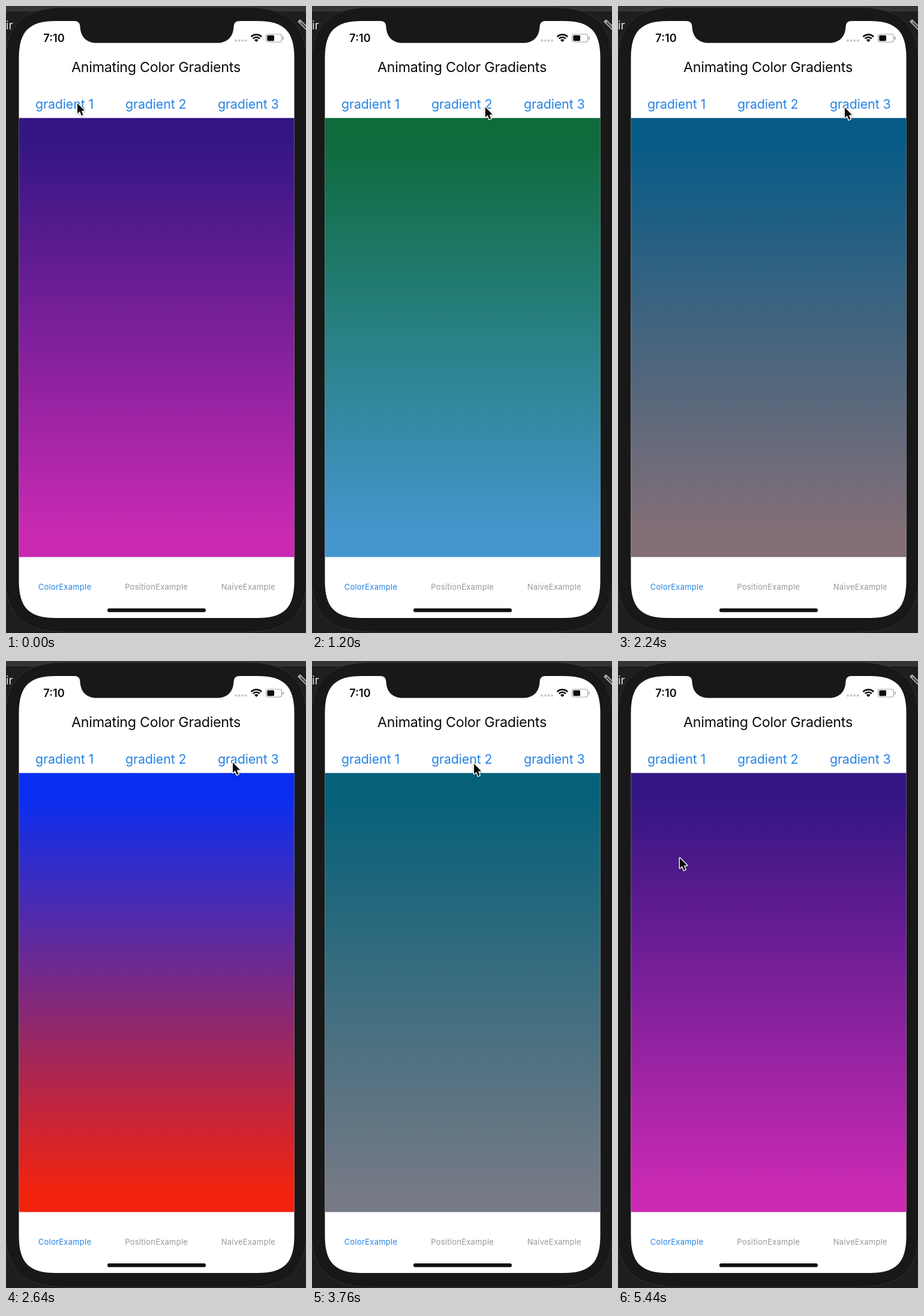
An HTML page with a canvas that plays this animation: 500x1044 px, repeating every 5520 ms.

```html
<!DOCTYPE html>
<html lang="en">
<head>
<meta charset="utf-8">
<title>Animating Color Gradients</title>
<style>
  html, body { margin: 0; width: 100%; height: 100%; overflow: hidden; background: #1e1e1f; }
  canvas { display: block; }
</style>
</head>
<body>
<canvas id="stage" width="500" height="1044"></canvas>
<script>
const ctx = document.getElementById('stage').getContext('2d');
const LOOP = 5520, STEP = 80, FADE = 600;
const FONT = 'Inter, Roboto, "Liberation Sans", sans-serif';
const BLUE = '#2583e4', INK = '#0c0c0e', BEZEL = '#181818';

// [top colour, bottom colour]
const palettes = [
  [[51, 22, 131], [202, 42, 178]],
  [[3, 131, 40], [34, 180, 214]],
  [[9, 46, 241], [241, 35, 14]]
];

const taps = [
  { down: 560, up: 780, id: 1 },
  { down: 1810, up: 1950, id: 2 },
  { down: 3280, up: 3420, id: 1 },
  { down: 4650, up: 4780, id: 0 }
];

// time, x, y of the pointer tip
const pointerPath = [
  [0, 119, 162], [80, 119, 162], [520, 247, 166], [960, 247, 166],
  [1600, 379, 173], [1760, 379, 173], [1840, 378, 169], [2720, 378, 169],
  [3240, 270, 171], [3920, 270, 171], [4560, 115, 168], [4960, 115, 168],
  [5440, 103, 328], [5520, 103, 328]
];

const clamp = v => Math.max(0, Math.min(1, v));
const ease = v => v * v * (3 - 2 * v);
const mix = (a, b, k) => a + (b - a) * k;
const mixColor = (a, b, k) => a.map((v, i) => mix(v, b[i], k));
const rgb = c => `rgb(${c.map(Math.round).join(',')})`;

function pointerAt(t) {
  const i = pointerPath.findIndex(p => p[0] > t);
  const a = pointerPath[i - 1], b = pointerPath[i];
  const k = ease((t - a[0]) / (b[0] - a[0]));
  return [mix(a[1], b[1], k), mix(a[2], b[2], k)];
}

function colorsAt(t) {
  let colors = palettes[0];
  for (const tap of taps) {
    const k = ease(clamp((t - tap.up) / FADE));
    colors = colors.map((c, i) => mixColor(c, palettes[tap.id][i], k));
  }
  return colors;
}

function buttonAlpha(id, t) {
  let alpha = 1;
  for (const { down, up, id: target } of taps) {
    if (target !== id || t < down) continue;
    const pressed = ease(clamp((Math.min(t, up) - down) / 150));
    const released = ease(clamp((t - up) / 250));
    alpha = Math.min(alpha, 1 - 0.8 * pressed * (1 - released));
  }
  return alpha;
}

function text(str, x, y, size, color, spacing = 0, weight = 400, align = 'center') {
  ctx.font = `${weight} ${size}px ${FONT}`;
  ctx.letterSpacing = spacing + 'px';
  ctx.textAlign = align;
  ctx.fillStyle = color;
  ctx.fillText(str, x, y);
}

function box(x, y, w, h, r, color) {
  ctx.beginPath();
  ctx.roundRect(x, y, w, h, r);
  ctx.fillStyle = color;
  ctx.fill();
}

// Rectangle with continuous-curvature corners reaching e along each side
function smoothBox(x, y, w, h, e, color) {
  const c = e * 0.273, r = x + w, b = y + h;
  ctx.beginPath();
  ctx.moveTo(x + e, y);
  ctx.lineTo(r - e, y);
  ctx.bezierCurveTo(r - c, y, r, y + c, r, y + e);
  ctx.lineTo(r, b - e);
  ctx.bezierCurveTo(r, b - c, r - c, b, r - e, b);
  ctx.lineTo(x + e, b);
  ctx.bezierCurveTo(x + c, b, x, b - c, x, b - e);
  ctx.lineTo(x, y + e);
  ctx.bezierCurveTo(x, y + c, x + c, y, x + e, y);
  ctx.fillStyle = color;
  ctx.fill();
}

function strokeLine(x1, y1, x2, y2, width, color) {
  ctx.beginPath();
  ctx.moveTo(x1, y1);
  ctx.lineTo(x2, y2);
  ctx.lineWidth = width;
  ctx.strokeStyle = color;
  ctx.stroke();
}

function drawDesktop() {
  ctx.fillStyle = '#1e1e1f';
  ctx.fillRect(0, 0, 500, 1044);
  ctx.fillStyle = '#353537';
  ctx.fillRect(0, 0, 500, 9);
  text('ir', 0, 39, 19, '#e4e4e4', 0, 400, 'left');
  strokeLine(488, 24, 502, 38, 6, '#a8a8a8');
  strokeLine(491, 27, 502, 38, 2, '#3a3a3b');
}

function drawPhone() {
  smoothBox(-2, 2.5, 504, 1040, 104, BEZEL);
  ctx.strokeStyle = '#303032';
  ctx.lineWidth = 1;
  ctx.stroke();
  smoothBox(21.5, 25, 459, 994, 62, '#fff');
}

function drawNotch() {
  ctx.fillStyle = BEZEL;
  ctx.beginPath();
  ctx.moveTo(114, 24);
  ctx.lineTo(114, 25);
  ctx.quadraticCurveTo(123, 25, 123.5, 34);
  ctx.bezierCurveTo(124, 51, 134, 61.5, 151, 61.5);
  ctx.lineTo(352, 61.5);
  ctx.bezierCurveTo(369, 61.5, 379, 51, 379.5, 34);
  ctx.quadraticCurveTo(380, 25, 389, 25);
  ctx.lineTo(389, 24);
  ctx.fill();
}

function drawStatus() {
  text('7:10', 80, 60, 18.2, INK, 0, 600);
  for (let i = 0; i < 4; i++) box(381 + i * 5.7, 55.5, 4, 4, 2, '#c9c9cb');

  // Wi-Fi arcs
  const cx = 417.3, cy = 60;
  ctx.strokeStyle = ctx.fillStyle = INK;
  ctx.lineWidth = 2.7;
  for (const r of [12.3, 8]) {
    ctx.beginPath();
    ctx.arc(cx, cy, r, -Math.PI * 0.75, -Math.PI * 0.25);
    ctx.stroke();
  }
  ctx.beginPath();
  ctx.moveTo(cx, cy);
  ctx.arc(cx, cy, 4.8, -Math.PI * 0.75, -Math.PI * 0.25);
  ctx.fill();

  // Battery
  ctx.beginPath();
  ctx.roundRect(433.5, 47, 26, 13, 3.5);
  ctx.strokeStyle = '#a2a2a4';
  ctx.lineWidth = 1.2;
  ctx.stroke();
  box(435.3, 48.8, 11.7, 9.4, 1.8, INK);
  box(461, 51, 1.6, 5, 0.8, '#a2a2a4');
}

function drawGradient(t) {
  const [top, bottom] = colorsAt(t).map(rgb);
  const fill = ctx.createLinearGradient(0, 186.5, 0, 917.5);
  fill.addColorStop(0.05, top);
  fill.addColorStop(0.95, bottom);
  ctx.fillStyle = fill;
  ctx.fillRect(21.5, 186.5, 459, 731);
}

function drawLabels(t) {
  text('Animating Color Gradients', 250, 110, 23.3, INK, -0.28);
  [97.5, 249.7, 403.7].forEach((x, i) => {
    ctx.globalAlpha = buttonAlpha(i, t);
    text('gradient ' + (i + 1), x, 171, 21.4, BLUE, -0.12);
  });
  ctx.globalAlpha = 1;
  text('ColorExample', 98, 972, 13, BLUE, 0.25);
  text('PositionExample', 250.7, 972, 13, '#98989b', 0.25);
  text('NaiveExample', 403.8, 972, 13, '#98989b', 0.25);
  box(169, 1003, 164, 6.3, 3.1, '#111');
}

const arrow = new Path2D('M0 0V17L4 13.5L6.8 20.5L9.6 19.3L6.8 12.7L12 12.3Z');

function drawPointer(t) {
  ctx.save();
  ctx.translate(...pointerAt(t));
  ctx.shadowColor = 'rgba(0,0,0,.3)';
  ctx.shadowBlur = 3;
  ctx.shadowOffsetY = 1;
  ctx.lineJoin = 'round';
  ctx.lineWidth = 2.8;
  ctx.strokeStyle = '#fff';
  ctx.stroke(arrow);
  ctx.shadowColor = 'transparent';
  ctx.fillStyle = '#0a0a0a';
  ctx.fill(arrow);
  ctx.restore();
}

function draw(t) {
  drawDesktop();
  drawPhone();
  drawNotch();
  drawStatus();
  drawGradient(t);
  drawLabels(t);
  drawPointer(t);
}

const start = performance.now();
function tick() {
  const t = (performance.now() - start) % LOOP;
  draw(Math.floor(t / STEP) * STEP);
  requestAnimationFrame(tick);
}
tick();
</script>
</body>
</html>
```
